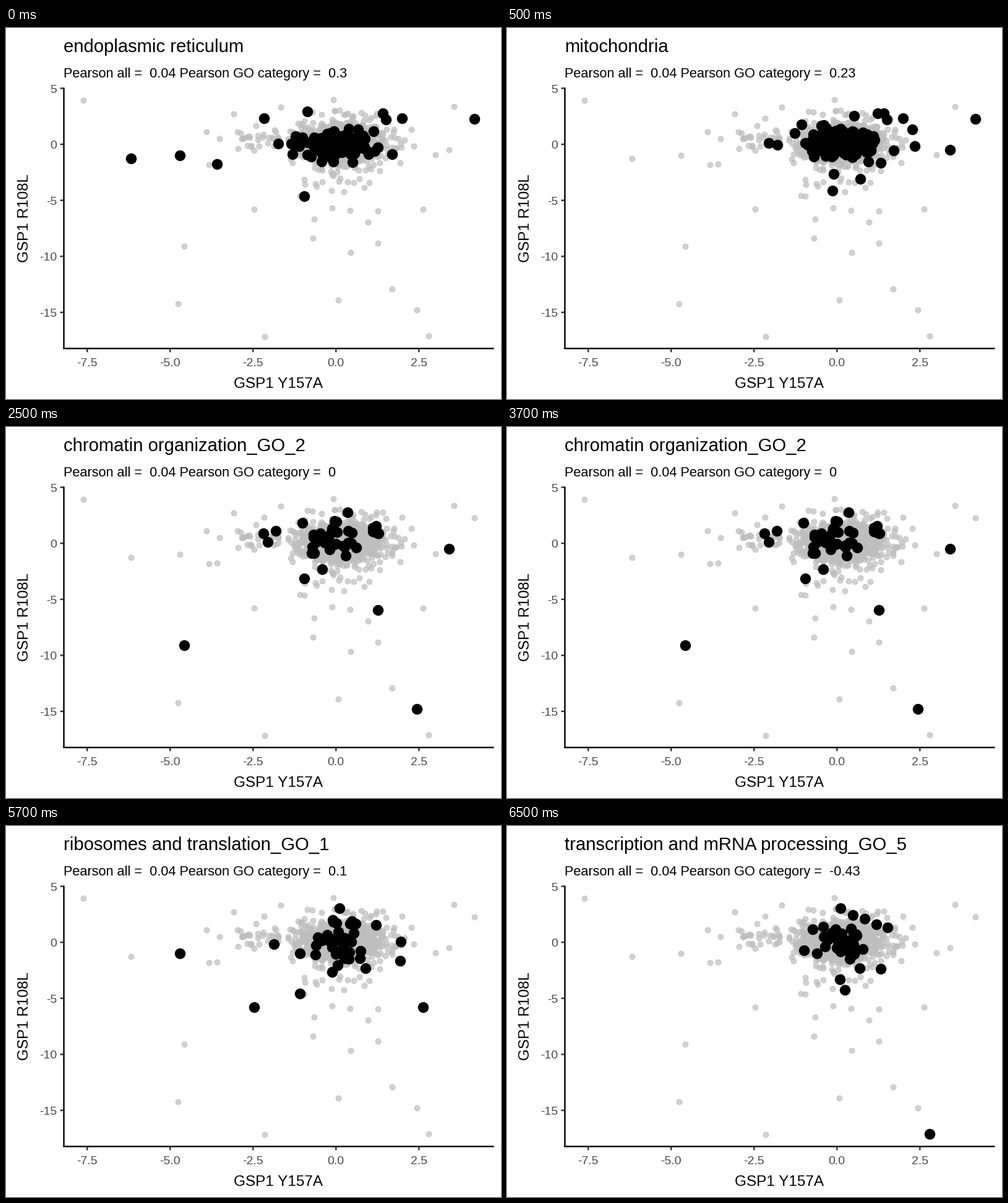
A matplotlib script for the animation above (8000 ms loop, 800x600 px).

```python
import matplotlib.pyplot as plt
import numpy as np
from matplotlib.animation import FuncAnimation

W, H, DPI = 800, 600, 100
PX = 72 / DPI  # points per pixel
LEFT, RIGHT, TOP, BOTTOM = 93.5, 788.5, 96.5, 518.3

plt.rcParams["font.family"] = "Liberation Sans"
rng = np.random.default_rng(11)


def cloud(count, center, spread, reach=2.0):
    """Gaussian scatter, redrawn until all of it lies within `reach` sigmas."""
    z = rng.normal(size=(6 * count, 2))
    z = z[np.hypot(*z.T) < reach][:count]
    return np.array(center) + z * spread


# Positions are stage pixels, y pointing down.
reticulum = np.vstack([
    [(202, 211), (281, 206), (341, 219.5), (417, 145.5), (487, 134.5),
     (757, 146.5), (639.5, 146), (608.5, 138), (614, 148), (624, 204),
     (481.5, 271.5), (440, 186.5)],
    cloud(7, (463, 192), (7, 9)),
    cloud(110, (537, 186), (26, 10)),
    cloud(24, (540, 188), (32, 20))])

mitochondria = np.vstack([
    [(757, 146.5), (716, 197), (654.5, 164), (659, 190.5), (639.5, 146),
     (599, 138), (608.5, 138), (614, 148), (625, 198), (603.5, 217.5),
     (423, 186), (437, 189), (476, 155.5), (465, 170), (571, 244),
     (526, 263), (528, 236), (561, 142)],
    cloud(140, (541, 186), (30, 12)),
    cloud(30, (538, 188), (37, 20))])

chromatin = np.vstack([
    [(716, 197), (664, 455.5), (601, 295.5), (288, 353), (482, 245),
     (436, 167.5), (416, 172), (423, 186), (552, 138), (511, 229.5),
     (479, 155)],
    cloud(7, (594, 170), (5, 6)),
    cloud(32, (528, 184), (26, 17))])

ribosomes = np.vstack([
    [(281, 206), (401, 293), (673.5, 292.5), (474.5, 270.5), (474.5, 206),
     (433, 191), (637.5, 187), (636.5, 218), (538.5, 133), (581, 229.5),
     (598, 159.5), (527, 235.5)],
    cloud(36, (539, 187), (22, 22))])

transcription = np.vstack([
    [(683, 498), (545.5, 265), (538, 248), (604, 231), (570, 230),
     (615, 163.5), (597, 159), (578, 150), (538.5, 133), (559, 144),
     (494, 167), (480, 201)],
    cloud(36, (537, 191), (22, 18))])

background = np.vstack([
    [(125, 117), (724, 127), (694, 205), (624, 422), (277.5, 446),
     (417.5, 499), (536.5, 440), (556.5, 363), (600.5, 348), (584.5, 314),
     (498, 309), (496, 340), (527, 291), (556, 295), (328, 221), (324, 168),
     (345, 179), (368, 139), (443.5, 128), (529, 116)],
    cloud(24, (405, 179), (23, 13)),
    cloud(10, (535, 253), (32, 9)),
    cloud(480, (540, 186), (33, 17), 2.3),
    cloud(210, (540, 184), (50, 26), 2.1),
    reticulum, mitochondria, chromatin, ribosomes, transcription])

SCENES = [
    ("endoplasmic reticulum", "0.3", reticulum),
    ("mitochondria", "0.23", mitochondria),
    ("chromatin organization_GO_2", "0", chromatin),
    ("ribosomes and translation_GO_1", "0.1", ribosomes),
    ("transcription and mRNA processing_GO_5", "-0.43", transcription),
]

fig = plt.figure(figsize=(W / DPI, H / DPI), dpi=DPI, facecolor="white")
ax = fig.add_axes([0, 0, 1, 1])
ax.set(xlim=(0, W), ylim=(H, 0))
ax.axis("off")


def label(x, y, text, size, **kw):
    return ax.text(x, y, text, fontsize=size * PX, va="baseline", **kw)


def line(xs, ys, color):
    ax.plot(xs, ys, color=color, lw=2.4 * PX, solid_capstyle="butt", snap=False)


def dots(xy, diameter, color, **kw):
    return ax.scatter(*xy.T, s=(diameter * PX) ** 2, c=color, snap=False,
                      edgecolors=color, linewidths=1.23 * PX, **kw)


# A point drawn twice would look too dark.
dots(np.unique(background, axis=0), 8.8, "#bebebe", alpha=0.7, zorder=1)
marked = dots(reticulum, 16.2, "black", zorder=3)

for value in np.arange(-7.5, 2.6, 2.5):
    x = 533.3 + 53.6 * value
    line([x, x], [BOTTOM, BOTTOM + 6], "#333333")
    label(x, 547, f"{value:.1f}", 19.5, color="#4d4d4d", ha="center")
for value in range(-15, 6, 5):
    y = 188.1 - 18.12 * value
    line([LEFT - 6, LEFT], [y, y], "#333333")
    label(82.5, y + 7.2, str(value), 19.5, color="#4d4d4d", ha="right")
line([LEFT, LEFT], [TOP, BOTTOM], "black")
line([LEFT - 1.2, RIGHT], [BOTTOM, BOTTOM], "black")

label(440, 582, "GSP1 Y157A", 24.3, ha="center")
label(35.5, 307.5, "GSP1 R108L", 24.3, ha="center", rotation=90,
      rotation_mode="anchor")
title = label(93, 39, "", 29.2)
subtitle = label(93, 80, "", 21.75)


def update(i):
    # The first scene lasts one step, the others up to four.
    name, score, xy = SCENES[(i + 3) // 4]
    title.set_text(name)
    subtitle.set_text(f"Pearson all =  0.04 Pearson GO category =  {score}")
    marked.set_offsets(xy)
    return title, subtitle, marked


anim = FuncAnimation(fig, update, frames=16, interval=500, repeat=True,
                     repeat_delay=0, init_func=lambda: update(0))
plt.show()
```
